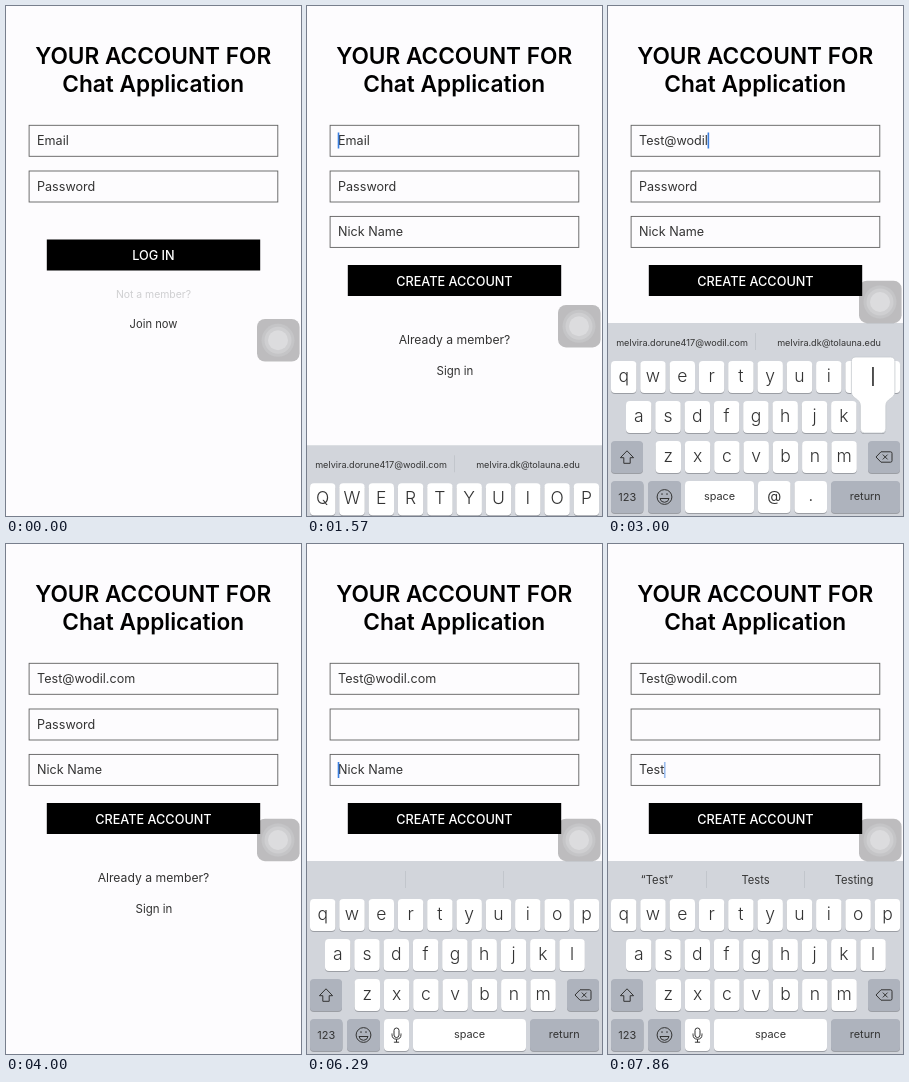
These frames come from a looping animation (295x510 px, 8000 ms). An HTML page:

```html
<!DOCTYPE html>
<html lang="en">
<head>
<meta charset="utf-8">
<title>Chat sign-up</title>
<style>
  html, body { margin: 0; width: 100%; height: 100%; overflow: hidden; background: #fdfcfe; }
  svg { display: block; width: 295px; height: 510px; font-family: Inter, Roboto, sans-serif; }
</style>
</head>
<body>
<svg id="stage" viewBox="0 0 295 510"></svg>
<script>
const LOOP = 8000;
const TICK = 1000 / 7;
const INK = '#333';
const GREY = '#aeb3bd';
const stage = document.getElementById('stage');

function add(parent, tag, attrs = {}, text) {
  const node = document.createElementNS('http://www.w3.org/2000/svg', tag);
  for (const name in attrs) node.setAttribute(name, attrs[name]);
  if (text !== undefined) node.textContent = text;
  parent.appendChild(node);
  return node;
}
const group = (parent = stage) => add(parent, 'g');
const rect = (parent, x, y, width, height, fill, more) =>
  add(parent, 'rect', { x, y, width, height, fill, ...more });
const path = (parent, d, more) =>
  add(parent, 'path', { d, fill: 'none', stroke: INK, 'stroke-width': 1, 'stroke-linejoin': 'round', ...more });
const label = (parent, text, x, y, size, more) =>
  add(parent, 'text', { x, y, 'font-size': size, fill: INK, 'text-anchor': 'middle', ...more }, text);
const show = (node, on) => node.setAttribute('display', on ? 'inline' : 'none');
const clamp = v => Math.max(0, Math.min(1, v));

// Form
rect(stage, 0, 0, 295, 510, '#fdfcfe');
const title = { 'font-weight': 600, fill: '#000' };
label(stage, 'YOUR ACCOUNT FOR', 147.2, 58, 22.65, title);
label(stage, 'Chat Application', 147.2, 86, 22.65, title);

function field(parent, y, placeholder) {
  rect(parent, 23.1, y, 248.7, 31, '#fdfcfe', { stroke: '#606060', 'stroke-width': 0.9 });
  return label(parent, placeholder, 31, y + 20, 12.6, { 'text-anchor': 'start' });
}
function button(parent, y, text) {
  rect(parent, 40.8, y, 213.4, 31, '#000');
  label(parent, text, 147.4, y + 20.6, 12.7, { fill: '#fff', 'font-weight': 500 });
}
const email = field(stage, 119.3, 'Email');
const password = field(stage, 165, 'Password');

const login = group();
button(login, 233.5, 'LOG IN');
label(login, 'Not a member?', 147.5, 292, 10.4, { fill: '#cfcfd1' });
label(login, 'Join now', 147.5, 322, 11.2);

const signup = group();
const nick = field(signup, 210.4, 'Nick Name');
button(signup, 259, 'CREATE ACCOUNT');
label(signup, 'Already a member?', 147.5, 338, 12.2);
label(signup, 'Sign in', 148, 369, 11.5);

const cursor = rect(stage, 0, 0, 1.6, 16, '#3b7fe0');

// Keyboard
const keyboard = group();
rect(keyboard, 0, 317, 295, 193, '#d2d5db');

function key(parent, x, y, width, fill = '#fff') {
  rect(parent, x, y + 1, width, 32, '#9b9ea4', { rx: 4 });
  return rect(parent, x, y, width, 32, fill, { rx: 4 });
}
const letters = {};
[['qwertyuiop', 3, 355], ['asdfghjkl', 18, 395], ['zxcvbnm', 47.6, 435]].forEach(([row, left, y]) => {
  [...row].forEach((char, i) => {
    const x = left + i * 29.3;
    key(keyboard, x, y, 25.4);
    const glyph = label(keyboard, char, x + 12.7, y + 20.8, 17.5, { 'font-weight': 300 });
    letters[char] = { x, y, glyph };
  });
});

const shiftKey = key(keyboard, 3, 435, 32, GREY);
const shiftIcon = path(keyboard, 'M19 444.8l6.6 6.9h-3.4v5.6h-6.4v-5.6h-3.4z');
key(keyboard, 260, 435, 32, GREY);
path(keyboard, 'M273 445.8h9.5q1.5 0 1.5 1.5v7.4q0 1.5-1.5 1.5H273l-5-5.2zM274.8 448.6l4.8 4.8m0-4.8l-4.8 4.8');
key(keyboard, 3, 475, 32.5, GREY);
label(keyboard, '123', 19.3, 494.8, 11);
key(keyboard, 40, 475, 33, GREY);
add(keyboard, 'circle', { cx: 56.5, cy: 491, r: 7.4, fill: 'none', stroke: INK });
path(keyboard, 'M52 492.5h9q-.7 3.8-4.5 3.8t-4.5-3.8zM54 487.2v1.8m5-1.8v1.8');
key(keyboard, 223, 475, 69, GREY);
label(keyboard, 'return', 257.3, 494, 10.9);

const divider = (parent, x) => rect(parent, x, 327, 0.8, 17, '#bfc2c8');

const mailKeys = group(keyboard);
key(mailKeys, 77, 475, 69);
label(mailKeys, 'space', 111.5, 494, 10.9);
const symbolKeys = { '@': key(mailKeys, 150, 475, 32.5), '.': key(mailKeys, 186.5, 475, 32.5) };
label(mailKeys, '@', 166.3, 495, 14.5);
label(mailKeys, '.', 202.8, 494.5, 14.5);
divider(mailKeys, 147.2);
label(mailKeys, 'melvira.dorune417@wodil.com', 74, 339.8, 9.1);
label(mailKeys, 'melvira.dk@tolauna.edu', 221, 339.8, 9.1);

const textKeys = group(keyboard);
key(textKeys, 77, 475, 25);
rect(textKeys, 87, 484, 5, 9.5, 'none', { rx: 2.5, stroke: INK });
path(textKeys, 'M85 489.5v1q0 4.7 4.5 4.7t4.5-4.7v-1M89.5 495.2v3m-2.6 0h5.2');
key(textKeys, 106, 475, 113);
label(textKeys, 'space', 162.5, 494, 10.9);
divider(textKeys, 98);
divider(textKeys, 196);
const words = group(textKeys);
['“Test”', 'Tests', 'Testing'].forEach((word, i) => label(words, word, 49 + i * 98.5, 339.8, 11.2));

// Enlarged key: a wide head that narrows down onto the key
const popup = group(keyboard);
path(popup, 'M-4.5 -44H30q4.5 0 4.5 4.5V-9C34.5 -2 25.4 -3 25.4 5V28q0 4 -4 4H4q-4 0 -4 -4V5C0 -3 -9 -2 -9 -9V-39.5q0 -4.5 4.5 -4.5z',
  { fill: '#fff', stroke: '#c6c9ce', 'stroke-width': 0.8 });
const popupGlyph = label(popup, '', 12.7, -15, 25.5, { 'font-weight': 300 });

// Floating touch button, see-through where it overlaps the form button
const touch = group();
rect(touch, 251, 313, 42.6, 42.5, '#000', { rx: 8, 'fill-opacity': 0.255 });
[[16.5, '#c5c5c7'], [13.5, '#cfcfd1'], [10, '#dcdcde']].forEach(([r, fill]) =>
  add(touch, 'circle', { cx: 272, cy: 334.3, r, fill }));

// [time, typed text, pressed key]
const emailTyping = [
  [1570, '', ''], [1860, 'T', 't'], [2000, 'Te', 'e'], [2140, 'Tes', 's'], [2290, 'Test', ''],
  [2570, 'Test@', '@'], [2710, 'Test@w', 'w'], [2860, 'Test@wod', 'd'], [3000, 'Test@wodil', 'l'],
  [3140, 'Test@wodil', ''], [3290, 'Test@wodil.', '.'], [3430, 'Test@wodil.c', 'c'],
  [3570, 'Test@wodil.com', 'm'], [3710, 'Test@wodil.com', '']
];
const nickTyping = [
  [6290, '', ''], [6860, 'T', 't'], [7000, 'Te', 'e'], [7140, 'Tes', 's'], [7290, 'Test', 't'], [7430, 'Test', '']
];
function typed(steps, t) {
  const [, text, pressed] = steps.filter(([start]) => t >= start).pop() || [0, '', ''];
  return { text, pressed };
}

function press(char, upper) {
  const target = letters[char];
  show(popup, target);
  if (target) {
    popup.setAttribute('transform', `translate(${target.x} ${target.y})`);
    popupGlyph.textContent = upper ? char.toUpperCase() : char;
  }
  for (const symbol in symbolKeys) symbolKeys[symbol].setAttribute('fill', symbol === char ? GREY : '#fff');
}

function setShift(on) {
  for (const char in letters) letters[char].glyph.textContent = on ? char.toUpperCase() : char;
  shiftKey.setAttribute('fill', on ? '#fff' : GREY);
  shiftIcon.setAttribute('fill', on ? INK : 'none');
}

function placeCursor(node, text, y, opacity) {
  const width = text ? node.getComputedTextLength() : 0;
  cursor.setAttribute('x', 30.7 + width);
  cursor.setAttribute('y', y);
  cursor.setAttribute('opacity', opacity);
}

function update(t) {
  // The screen refreshes seven times a second.
  const tick = Math.floor((t + 5) / TICK) * TICK;
  const swap = clamp((tick - 830) / 300);
  login.setAttribute('opacity', 1 - swap);
  signup.setAttribute('opacity', swap);

  const mailing = t >= 1570 && t < 4000;
  const naming = t >= 6290;
  const mail = typed(emailTyping, t);
  const name = typed(nickTyping, t);
  email.textContent = mail.text || 'Email';
  nick.textContent = name.text || 'Nick Name';
  show(password, t < 5000);

  const rise = t < 1570 ? 0 : 1 - (1 - clamp((tick - 1500) / 350)) ** 2;
  show(keyboard, mailing || naming);
  keyboard.setAttribute('transform', `translate(0 ${193 * (1 - rise)})`);
  touch.setAttribute('transform', `translate(0 ${-38.3 * rise})`);
  show(mailKeys, mailing);
  show(textKeys, naming);
  show(words, t >= 7430);

  const upper = (t >= 1570 && t < 2000) || (t >= 6710 && t < 7000);
  setShift(upper);
  press(naming ? name.pressed : mail.pressed, upper);

  show(cursor, mailing || naming);
  if (mailing) placeCursor(email, mail.text, 126.5, 1);
  if (naming) placeCursor(nick, name.text, 218, t >= 7860 ? 0.5 : 1);
}

function frame(now) {
  update(now % LOOP);
  requestAnimationFrame(frame);
}
update(0);
requestAnimationFrame(frame);
</script>
</body>
</html>
```
